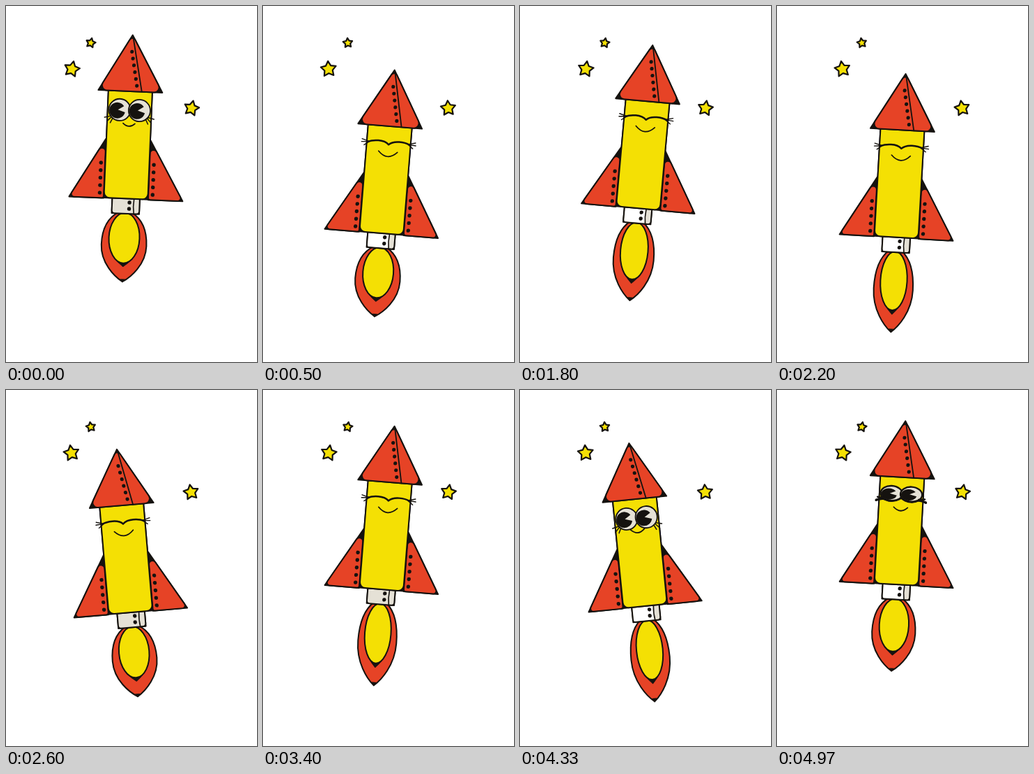
An HTML page with a canvas for the animation above (5 s loop, 360 by 509 pixels).

```html
<!DOCTYPE html>
<html lang="en">
<head>
<meta charset="utf-8">
<title>Rocket</title>
<style>
html, body { margin: 0; width: 100%; height: 100%; overflow: hidden; background: #fff; }
canvas { display: block; width: 360px; height: 509px; }
</style>
</head>
<body>
<canvas id="stage"></canvas>
<script>
const W = 360, H = 509, LOOP = 5000, CYCLE = 41, TAU = Math.PI * 2;
const RED = '#e64326', YELLOW = '#f4e004', BLACK = '#15120f', CREAM = '#e5e1d6';
const canvas = document.getElementById('stage');
const dpr = window.devicePixelRatio || 1;
canvas.width = W * dpr;
canvas.height = H * dpr;
const c = canvas.getContext('2d');

function paint(fill, width = 2) {
  if (fill) { c.fillStyle = fill; c.fill(); }
  if (width) { c.strokeStyle = BLACK; c.lineWidth = width; c.stroke(); }
}

function dot(x, y, r) {
  c.beginPath();
  c.arc(x, y, r, 0, TAU);
  paint(BLACK, 0);
}

function dots(count, x0, y0, x1, y1, r = 2.7) {
  for (let i = 0; i < count; i++) {
    const k = i / (count - 1);
    dot(x0 + (x1 - x0) * k, y0 + (y1 - y0) * k, r);
  }
}

function line(path, width = 1.6) {
  c.strokeStyle = BLACK;
  c.lineWidth = width;
  c.stroke(new Path2D(path));
}

// Sharp black silhouette with a round-cornered colour area on top
function inked(points, radii, fill) {
  c.beginPath();
  points.forEach(p => c.lineTo(...p));
  c.closePath();
  paint(BLACK);
  const n = points.length, last = points[n - 1];
  c.beginPath();
  c.moveTo((last[0] + points[0][0]) / 2, (last[1] + points[0][1]) / 2);
  points.forEach((p, i) => c.arcTo(...p, ...points[(i + 1) % n], radii[i]));
  c.closePath();
  paint(fill);
}

function star(x, y, r, turn) {
  c.beginPath();
  for (let i = 0; i < 10; i++) {
    const a = turn + i * TAU / 10, d = i % 2 ? r * 0.53 : r;
    c.lineTo(x + d * Math.sin(a), y - d * Math.cos(a));
  }
  c.closePath();
  paint(YELLOW, 2.2);
}

function flame(phase) {
  const len = 108 - 9.5 * Math.cos(TAU * 7 * phase / CYCLE);
  const h = (66 - (len - 99) * 0.5) / 2 - 0.8;
  const at = k => 256 + len * k;
  c.beginPath();
  c.moveTo(0, at(0.99));
  c.bezierCurveTo(-h * 0.36, at(0.92), -h, at(0.73), -h, at(0.46));
  c.bezierCurveTo(-h, at(0.27), -h * 0.82, at(0.08), -9, at(-0.02));
  c.lineTo(9, at(-0.02));
  c.bezierCurveTo(h * 0.82, at(0.08), h, at(0.27), h, at(0.46));
  c.bezierCurveTo(h, at(0.73), h * 0.36, at(0.92), 0, at(0.99));
  paint(RED);
  c.beginPath();
  c.moveTo(0, at(0.99));
  c.lineTo(-4, at(0.95));
  c.lineTo(4, at(0.95));
  paint(BLACK, 0);

  c.beginPath();
  c.moveTo(-h * 0.6, at(0.5));
  c.quadraticCurveTo(-h * 0.45, at(0.67), 0, at(0.77));
  c.quadraticCurveTo(h * 0.45, at(0.67), h * 0.6, at(0.5));
  paint(BLACK, 1);
  c.beginPath();
  c.ellipse(0, at(0.355), h * 0.68, len * 0.365, 0, 0, TAU);
  paint(YELLOW);
}

function nozzle(pale) {
  inked([[-19.5, 234], [20, 234], [20, 256], [-19.5, 256]], [0, 0, 4, 4], CREAM);
  if (pale) {
    c.fillStyle = '#fff';
    c.fillRect(-18, 236, 28.5, 18.6);
  }
  line('M11.8 235 Q10.4 246 12.2 256');
  dots(2, 5.4, 240, 5.2, 249);
}

function fin(side, dotX) {
  inked([[32 * side, 150], [81.5 * side, 235], [32 * side, 235]], [5, 4, 3], RED);
  dots(5, dotX, 184.7, dotX, 227.6);
}

function eye(x, squash) {
  c.save();
  c.translate(x, squash < 1 ? 105 : 108);
  c.scale(1, squash);
  c.beginPath();
  c.arc(0, 0, 15.6, 0, TAU);
  paint(CREAM, 0);
  c.save();
  c.clip();
  c.beginPath();
  c.moveTo(-2.5, 0);
  c.arc(-3.4, 1, 11.4, 0.2, TAU - 0.6);
  c.closePath();
  paint(BLACK, 0);
  c.restore();
  c.beginPath();
  c.arc(0, 0, 15.6, 0, TAU);
  c.restore();
  paint(null, squash < 1 ? 2.4 : 1.8);
}

function face(phase) {
  const closed = phase >= 3 && phase <= 24;
  const squash = { 1: 0.7, 2: 0.4, 25: 0.7 }[phase] || 1;
  const smile = closed ? 1 : { 1: 0.3, 2: 0.7, 25: 0.6, 26: 0.3 }[phase] || 0;
  const half = 8.5 + 5 * smile, y = 127 - 9.5 * smile, depth = 4 + 3 * smile;
  line(`M${-half} ${y} Q0 ${y + depth * 2} ${half} ${y}`, 1.7);

  if (closed) {
    line('M-30 105.5 Q-24 102.5 -15 102.5 Q-5 102.5 0 107.5 Q5 102.5 15 102.5 Q24 102.5 30 105.5', 2.5);
    for (const s of [-1, 1])
      line(`M${28 * s} 104.8 L${38.5 * s} 102 M${28 * s} 105 L${39 * s} 106 M${28 * s} 105.2 L${35 * s} 110.5`, 1.4);
    return;
  }
  if (squash === 1) {
    for (const s of [-1, 1])
      line(`M${25 * s} 117 L${35.5 * s} 119.5 M${25 * s} 118 L${32 * s} 125.5 M${23 * s} 119 L${27 * s} 127`, 1.5);
  }
  eye(-14.2, squash);
  eye(14.2, squash);
  if (squash < 1) {
    const low = 105 + 15.6 * squash;
    line(`M-36 ${low} Q-27 ${low - 4} -22 ${low - 2} Q-12 ${low + 2} 0 ${low - 5} Q12 ${low + 2} 22 ${low - 2} Q27 ${low - 4} 36 ${low}`, 2.8);
    for (const s of [-1, 1])
      line(`M${26 * s} ${low - 4} L${36 * s} ${low - 1} M${25 * s} ${low - 4} L${34 * s} ${low - 5}`, 2.4);
  }
}

function rocket(phase, pale) {
  flame(phase);
  nozzle(pale);
  fin(-1, -37.8);
  fin(1, 38.1);
  inked([[-31.5, 78], [31.5, 78], [31.5, 234.5], [-31.5, 234.5]], [0, 0, 8, 8], YELLOW);
  inked([[0, 0.5], [46, 81], [-46, 81]], [4.5, 7, 7], RED);
  line('M1 4 L16.4 81', 1.8);
  dots(6, 0, 24.4, 9, 72.8, 2.6);
  face(phase);
}

function draw(now) {
  // 25 poses a second on a 30 per second grid; the lead absorbs clock rounding
  const tick = Math.floor(((now + 4) % LOOP) * 0.03);
  const pose = Math.floor(tick * 5 / 6);
  const phase = pose % CYCLE;
  const w = TAU / CYCLE;
  const rad = Math.PI / 180;
  const tilt = 6 * Math.sin(w * (phase + 2.7)) * rad;
  const y = 248.2 - 31.5 * Math.cos(w * (phase + 3.4));
  const sway = Math.cos(TAU * pose / 40);
  const spin = 13 * sway * rad;

  c.setTransform(dpr, 0, 0, dpr, 0, 0);
  c.fillStyle = '#fff';
  c.fillRect(0, 0, W, H);
  c.lineJoin = c.lineCap = 'round';

  star(94.1 + sway * 0.4, 90.2, 11.4, spin);
  star(121.6, 52.8, 7, spin);
  star(265.7 + sway * 0.4, 146.2, 11, spin);

  c.translate(174.2, y);
  c.rotate(tilt);
  c.translate(0, -180);
  rocket(phase, pose % 7 > 2);
}

function loop() {
  draw(performance.now());
  requestAnimationFrame(loop);
}
loop();
</script>
</body>
</html>
```
